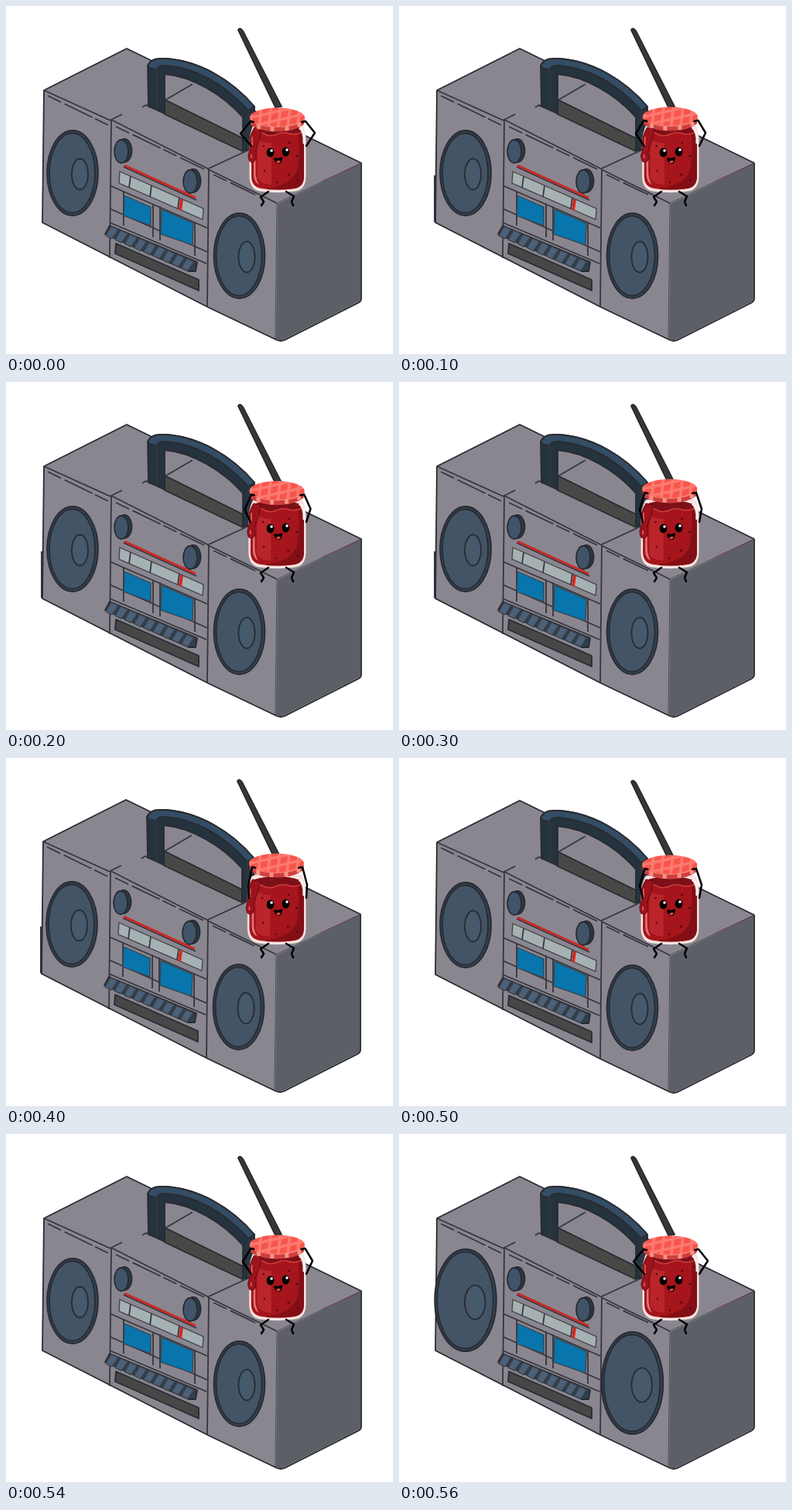
An HTML page that plays this animation: 500 px wide and 450 px high, repeating every 660 ms.

```html
<!DOCTYPE html>
<html lang="en">
<head>
<meta charset="utf-8">
<title>Jam on the radio</title>
<style>
html, body { margin: 0; width: 100%; height: 100%; overflow: hidden; background: #fff; }
svg { display: block; width: 500px; height: 450px; }
.ink { stroke: #292b31; stroke-width: 1.8; stroke-linejoin: round; }
.soft { stroke: #3d4349; stroke-width: 1.3; }
.line { fill: none; stroke: #35353c; stroke-width: 1.8; }
.limb { fill: none; stroke: #000; stroke-width: 2.5; stroke-linecap: round; stroke-linejoin: round; }
</style>
</head>
<body>
<svg viewBox="0 0 500 450">
  <defs>
    <pattern id="plaid" width="12" height="12" patternUnits="userSpaceOnUse" patternTransform="translate(350 145) skewX(-20) rotate(-14)">
      <rect width="12" height="12" fill="#f7554c"/>
      <path d="M0 3H12M3 0V12" stroke="#ff8b7f" stroke-width="3.5" opacity=".7"/>
    </pattern>
    <clipPath id="jarClip"><path id="jam" d="M321 158Q315 168 317 181V220Q317 234 330 236Q351 239 373 236Q385 234 385 220V176Q386 165 380 158Q351 148 321 158Z"/></clipPath>
  </defs>

  <g id="radio">
    <path id="bump" fill="#3a3b42" d="M48 219H45V279L48 281Z"/>
    <!-- cabinet -->
    <path class="ink" fill="#8a8690" d="M49 109L156 55L459 203V378Q459 382 455 384L360 432Q355 434 350 432L262 390L47 280Z"/>
    <path fill="#5c5f66" d="M351 256L458 204V378Q458 381 454 383L359 431Q354 433 349 431Z"/>
    <path class="line" d="M49 109L135 148M263 212L350 255M136 146L134 326M262 210L260 389M136 147L150 140M262 210L314 186M136 147L262 211M176 131L181 128L206 140"/>
    <path fill="none" stroke="#4c4d54" d="M350 255L459 203M350 255L348 430"/>
    <path d="M408 227L458 204" stroke="#6d3553"/>
    <path class="line" stroke-dasharray="19 5 40 4" d="M54 116L132 154M142 156L256 211M268 218L322 244"/>

    <!-- aerial and handle -->
    <path fill="#343938" class="ink" d="M300 31Q302 27 306 32L356 130L348 131Z"/>
    <path class="line" d="M205 122L241 101"/>
    <path fill="#484847" class="ink" d="M205 121L306 171V188L205 140Z"/>
    <path fill="#25333f" class="ink" d="M183 77Q187 67 204 68C250 70 292 96 321 130V184L306 187V144C280 114 240 91 205 88V138L184 130Z"/>
    <path fill="#344d65" class="ink" d="M184 76Q188 67 204 68C250 70 292 96 321 130L313 135C282 100 245 80 207 77Q196 76 195 83L184 79Z"/>
    <path class="line" d="M195 83V134M313 135V186"/>

    <!-- control panel -->
    <g class="ink">
      <ellipse cx="153" cy="187" rx="9.5" ry="15" fill="#293947"/>
      <ellipse cx="149" cy="188" rx="9" ry="15" fill="#40556a"/>
      <ellipse cx="242" cy="226" rx="9.5" ry="15" fill="#293947"/>
      <ellipse cx="238" cy="227" rx="9" ry="15" fill="#40556a"/>
    </g>
    <path class="line" d="M152 208L246 251"/>
    <path stroke="#ce2724" stroke-width="3" d="M153 206L245 248"/>
    <path class="soft" fill="#a6b1b3" d="M147 214L255 262L254 276L146 229Z"/>
    <path class="line" d="M161 220L159 235M188 232L186 247M224 248L222 262M136 233L260 287M134 262L260 318M134 280L259 333M152 240V284M190 256V299M199 259V303M244 279V323"/>
    <path stroke="#d52820" stroke-width="4" d="M227 250L225 264"/>
    <path class="soft" fill="#0875ad" d="M153 245L187 260V284L152 271ZM201 263L242 281L241 309L200 295Z"/>
    <path class="ink" fill="#303e4e" d="M134 284L247 331L245 343L236 343L128 295Z"/>
    <g id="keys" class="soft" fill="#4c6077"></g>
    <path class="ink" fill="#464746" d="M142 307L249 354V368L141 320Z"/>

    <g id="speakers" class="ink"></g>
  </g>

  <!-- jam jar -->
  <g id="jar">
    <path fill="#f8e2df" d="M320 153Q314 165 314.500 180V221Q315 237 328 239.500Q351 243 374 239.500Q387 237 387.500 221V174Q388 162 382 151Q350 140 320 153Z"/>
    <use href="#jam" fill="#a5151b"/>
    <g clip-path="url(#jarClip)">
      <path fill="#830f16" d="M377 156Q381 184 376 212Q370 231 337 236L330 246H392V150Z"/>
      <path fill="#b9252a" d="M325 172Q333 177 343 177V231Q329 230 325 223Z"/>
      <path fill="#7c1018" stroke="#cf3b3b" stroke-width="1.5" d="M312 150V164Q325 160 333 165T350 166T366 165T392 160V150Z"/>
      <path fill="#dc7475" d="M320 182H322.500V216Q323 225 327 231Q320 228 320 217Z"/>
      <g fill="#4d0911">
        <circle cx="333" cy="181" r="1.2"/><circle cx="366" cy="177" r="1.3"/><circle cx="376" cy="194" r="1.4"/>
        <circle cx="334" cy="213" r="1.2"/><circle cx="365" cy="218" r="1.4"/><circle cx="350" cy="228" r="1.2"/><circle cx="377" cy="225" r="1.2"/>
      </g>
    </g>
    <path fill="none" stroke="#fff0ee" stroke-width="3" d="M379 157Q386 162 385 178"/>
    <path fill="#9d131c" stroke="#650d14" d="M321 157Q314 168 315 179Q316 185 313 193Q313 203 319 202Q325 199 322 190Q323 183 325 180Q329 170 330 159Z"/>
    <path fill="none" stroke="#e16767" stroke-width="1.5" d="M318 169V181M317 192V197"/>
  </g>
  <path class="limb" d="M339 240L329 247L333 253L330 258M362 240L372 246L369 253L371 258"/>
  <ellipse cx="341.500" cy="189.500" rx="4.800" ry="6"/>
  <ellipse cx="361.500" cy="188.500" rx="4.800" ry="6"/>
  <g fill="#fff"><circle cx="343" cy="187" r="1.800"/><circle cx="363" cy="186" r="1.800"/></g>
  <path d="M346 196Q351 198 357 195Q357 204 352 204Q347 204 346 196Z"/>
  <path fill="#e64c4e" d="M349 202Q352 198 355 201Q352 205 349 202Z"/>
  <g id="lid">
    <path fill="#cf3f3d" d="M315 145L317 155Q333 163 351 162.500Q374 162 385 153L386 145Z"/>
    <path stroke="#f29487" stroke-width="5" d="M326 153L327 159M344 156V162M363 155V161M379 150V156"/>
    <ellipse cx="350.500" cy="144" rx="35.500" ry="12.500" fill="url(#plaid)"/>
    <path fill="none" stroke="#ff8d82" stroke-width=".8" d="M315 145Q321 156 350 156.500Q379 156 386 145"/>
  </g>
  <path class="limb" id="arms"/>
</svg>
<script>
const $ = id => document.getElementById(id);
const LOOP = 660;

// start time, lid lift, inward elbow travel
const poses = [
  [0, 0, 0], [100, 1, 3], [200, 3.5, 5.5], [300, 6, 8], [400, 8, 10],
  [500, 6, 8], [520, 3.5, 5.5], [540, 1, 3], [560, 0, 0]
];

$("keys").innerHTML = Array.from({ length: 9 }, (_, i) => {
  const x = 136 + i * 12.2, y = 285 + i * 5.2;
  return `<path d="M${x} ${y}l9 4l-8 12l-8 -4Z"/>`;
}).join("");

const ellipse = (x, y, rx, ry, fill) =>
  `<ellipse cx="${x}" cy="${y}" rx="${rx}" ry="${ry}" fill="${fill}"/>`;

function speaker(x, y, loud) {
  const grow = loud ? 11 : 0;
  const rx = 33 + grow * .62, ry = 55 + grow;
  return ellipse(x, y - grow / 11, rx, ry, "#324252") +
    ellipse(x - .5, y - grow / 11, rx - 3.5, ry - 3.5, "#435467") +
    ellipse(x + 9.5 + grow / 4, y + 1.5, 10.5 + grow / 4, 20 + grow / 5, "#46596d");
}

function draw(time) {
  const [start, lift, bend] = poses.findLast(pose => pose[0] <= time);
  const loud = start === 560;
  const nudge = start === 400 ? -1 : 0;
  $("radio").setAttribute("transform", `translate(${nudge} ${nudge})`);
  $("bump").style.display = start >= 100 && start < 500 ? "" : "none";
  $("speakers").innerHTML = speaker(86, 216, loud) + speaker(301.5, 323, loud);

  $("jar").setAttribute("transform", `translate(388 0) scale(${1 + lift * .0045} 1) translate(-388 0)`);
  $("lid").setAttribute("transform", `translate(${-lift / 8} ${-lift})`);
  const hand = 149 - lift;
  $("arms").setAttribute("d",
    `M${317 - lift / 3} 181L${303 + bend} 165L${316 + lift / 4} ${hand}l4 1` +
    `M388 181L${399 - bend} 164L${387 - lift / 2} ${hand}l-5 1`);
}

function tick(now) {
  draw(now % LOOP);
  requestAnimationFrame(tick);
}
draw(0);
requestAnimationFrame(tick);
</script>
</body>
</html>
```
